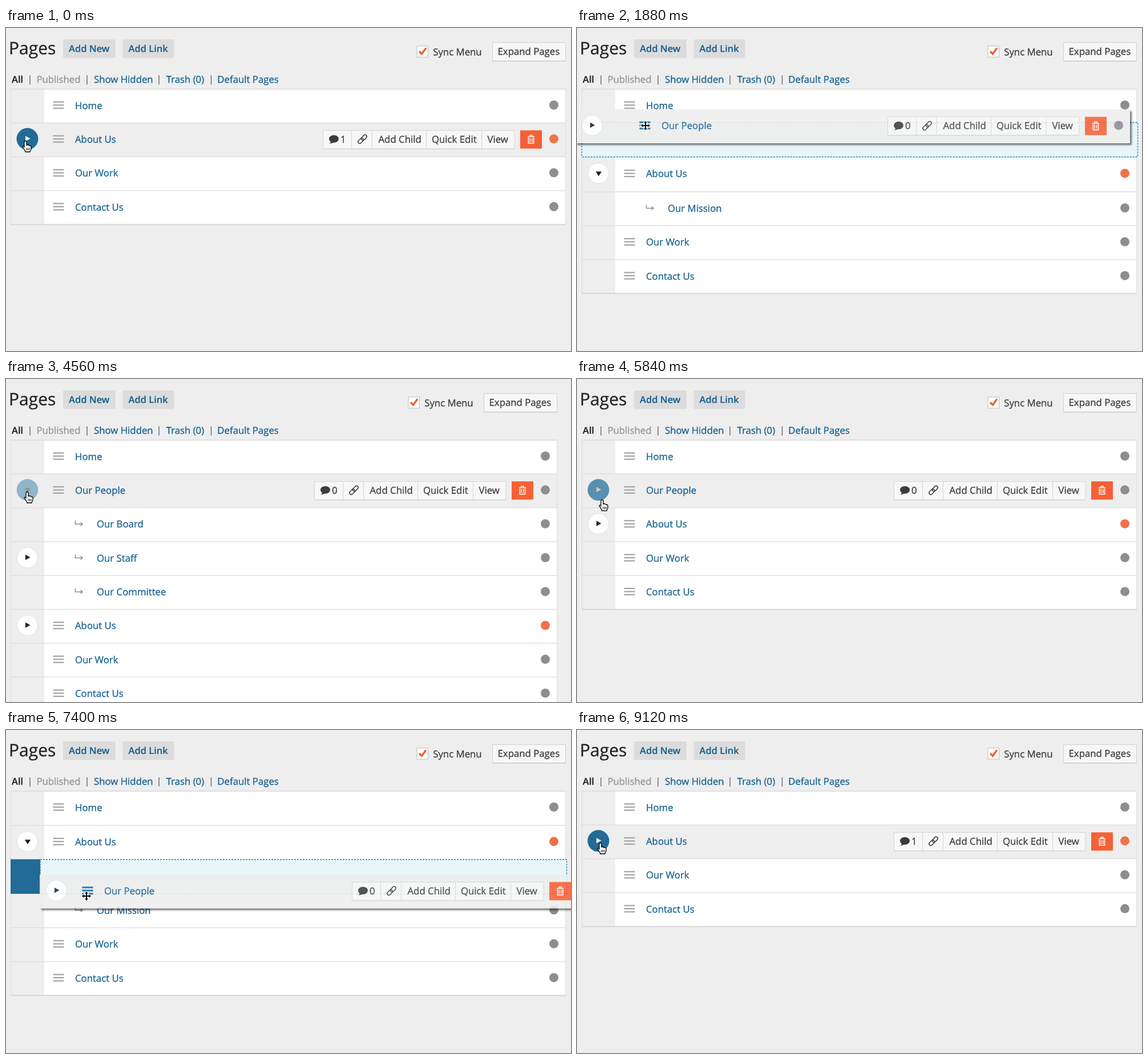
Animation of 990 by 566 pixels, one loop 9240 ms. Source, as an HTML page:

```html
<!DOCTYPE html>
<html lang="en">
<head>
<meta charset="utf-8">
<title>Page tree</title>
<style>
  html, body { margin: 0; width: 100%; height: 100%; overflow: hidden; background: #eee; }
  svg { display: block; width: 990px; height: 566px; font: 16.8px "Open Sans", sans-serif; }
  text { fill: currentColor; stroke: currentColor; stroke-width: .3px; text-rendering: geometricPrecision; }
  .semi { font-weight: 600; font-size: 16.5px; stroke-width: .2px; }
  .title { font-size: 30px; }
  .link { color: #16628f; }
  .lift { opacity: .87; filter: drop-shadow(3px 3px 1.5px #0009); }
</style>
</head>
<body>
<svg id="stage" viewBox="0 0 990 566"></svg>
<script>
const LOOP = 9240, STEP = 40, TOP = 107, PITCH = 59.35;
const BLUE = '#226b97', INK = '#3c3c3c', GRAY = '#8e8e92';
const stage = document.getElementById('stage');

const page = (label, more) => ({ label, ...more });
const HOME = page('Home'), ABOUT = page('About Us', { kids: true, hot: true, notes: 1 }),
  PEOPLE = page('Our People', { kids: true }), BOARD = page('Our Board', { child: true }),
  STAFF = page('Our Staff', { child: true, kids: true }), TEAM = page('Our Committee', { child: true }),
  MISSION = page('Our Mission', { child: true }), WORK = page('Our Work'), CONTACT = page('Contact Us');

// Each drag: start, end, grab point, is the lifted page a child
const DRAGS = [
  { from: 1000, to: 2120, grab: [131, 254], slot: 2, child: true, limit: 212 },
  { from: 6840, to: 7640, grab: [90, 204], slot: 1, child: false, limit: 240 }
];
// Pointer path: time, x, y
const PATH = [
  [0, 34, 199], [280, 36, 199], [840, 131, 254], [1040, 131, 254], [1880, 120, 171], [2040, 120, 171],
  [2120, 118, 173], [2280, 112, 178], [3000, 36, 199], [3880, 36, 199], [4160, 38, 436], [4280, 38, 436],
  [4560, 37, 199], [5080, 37, 199], [5720, 45, 201], [6120, 40, 256], [6200, 40, 256], [6600, 92, 204.5],
  [6840, 92, 204.5], [7160, 139, 288], [7400, 141, 291], [7640, 141, 283], [7760, 140, 278],
  [8320, 40, 199], [9080, 41, 199], [9240, 41, 199]
];

const wrap = t => (t + LOOP) % LOOP;
const within = (t, a, b) => t >= a && t < b;
const dragAt = t => DRAGS.find(d => within(t, d.from, d.to));

function pointer(t) {
  const i = PATH.findIndex(p => p[0] > t), a = PATH[i - 1], b = PATH[i];
  const u = (t - a[0]) / (b[0] - a[0]), s = u * u * (3 - 2 * u);
  return [a[1] + (b[1] - a[1]) * s, a[2] + (b[2] - a[2]) * s];
}

function isOpen(p, t) {
  if (p === ABOUT) return within(t, 200, 4240) || within(t, 6120, 8840);
  return p === PEOPLE && within(t, 3360, 4600);
}

function layout(t) {
  const drag = dragAt(t), aboutOpen = isOpen(ABOUT, t);
  const nested = t < 1000 || t >= 7640, list = [HOME];
  if (!nested && !drag) {
    list.push(PEOPLE);
    if (isOpen(PEOPLE, t)) list.push(BOARD, STAFF, TEAM);
  }
  list.push(ABOUT);
  if (aboutOpen) {
    if (nested) list.push(PEOPLE);
    list.push(MISSION);
  }
  list.push(WORK, CONTACT);
  let slot = 0;
  if (drag) {
    slot = pointer(t)[1] > drag.limit ? 2 : 1;
    list.splice(slot, 0, null);
  }
  const aboutAt = list.indexOf(ABOUT);
  const rows = list.map((p, i) => ({
    p, child: p && (p.child || (p === PEOPLE && nested)),
    y: TOP + PITCH * i + (drag && i >= aboutAt ? (i > aboutAt ? 2.2 : 1) : 0)
  }));
  const bottom = TOP + PITCH * list.length + (drag ? 2 : 0);
  return { rows, drag, slot, bottom, right: bottom > 566 ? 965 : 980 };
}

function hit(t) {
  const lay = layout(t), [x, y] = pointer(t);
  if (lay.drag) return { zone: 'handle' };
  const r = lay.rows.find(r => y >= r.y && y < r.y + PITCH);
  if (!r) return {};
  const cy = r.y + 28, hx = r.child ? 130 : 92;
  let zone = 'row';
  if (r.p.kids && Math.hypot(x - 37.5, y - cy) < 19.2) zone = 'toggle';
  else if (Math.abs(x - hx) < 12 && Math.abs(y - cy) < 12) zone = 'handle';
  return { p: r.p, zone };
}

// Button fade: share of the last few steps spent over it
function glow(p, t) {
  let n = 0;
  for (let k = 0; k < 4; k++) {
    const h = hit(wrap(t - k * STEP));
    if (h.p === p && h.zone === 'toggle') n++;
  }
  return n / 4;
}

const text = (x, y, s, color = INK, cls = '') => `<text x="${x}" y="${y}" color="${color}" class="${cls}">${s}</text>`;
const link = (x, y, s, cls = '') => text(x, y, s, INK, 'link ' + cls);
const rect = (x, y, w, h, fill, more = '') => `<rect x="${x}" y="${y}" width="${w}" height="${h}" fill="${fill}" ${more}/>`;
const path = (d, more) => `<path d="${d}" ${more}/>`;
const at = (x, y, s, more = '') => `<g transform="translate(${x} ${y})" ${more}>${s}</g>`;
const mix = (a, b, u) => `rgb(${a.map((v, i) => Math.round(v + (b[i] - v) * u))})`;

function toggle(open, g) {
  const tri = open ? 'M-4.7-3.2H5.7L.5 4.8Z' : 'M-3.5-5.2L5-.5L-3.5 4.2Z';
  return `<circle r="${18 + g}" fill="${mix([255, 255, 255], [34, 107, 151], g)}"
    stroke="${mix([224, 224, 224], [34, 107, 151], g)}" stroke-width="${1 - g}"/>` +
    path(tri, `fill="${mix([34, 34, 34], [255, 255, 255], g)}"`);
}

const handle = on => [-5.5, 0, 5.5].map(y =>
  rect(-9.5, y - (on ? 1.5 : 1), 19, on ? 3 : 2.2, on ? '#176ba3' : '#a3a3a3')).join('');
const elbow = path('M-6-5.5V.5H6M3-2.5L6.5.5L3 3.5', 'fill="none" stroke="#8d8d8d" stroke-width="1.5"');

const bubble = `<ellipse rx="8.5" ry="6.7" fill="${INK}"/>` + path('M-6 2C-5 6-6 7-8 8C-4 8.4-1 7 1 4Z', `fill="${INK}"`);
const chain = `<g transform="rotate(-45)" fill="none" stroke="${INK}" stroke-width="1.5">
  <rect x="-9.5" y="-3" width="11" height="6" rx="3"/><rect x="-1.5" y="-3" width="11" height="6" rx="3"/></g>`;
const bin = path('M-6-4.5H6M-2-4.5V-7H2V-4.5M-4.7-3V7H4.7V-3M-1.8-2V5M1.8-2V5', 'fill="none" stroke="#fff" stroke-width="1.5"');

// Tool strip, placed from the right edge of the list
function tools(p, right) {
  const s = rect(555.5, -14.8, 335.5, 31.8, '#f7f7f7', 'stroke="#d6d6d6"') +
    path('M605.5-15V17M641.5-15V17M736.5-15V17M833.5-15V17', 'stroke="#d6d6d6"') +
    path('M556 17.8H891', 'stroke="#d9d9d9"') +
    at(574.5, 0, bubble) + text(586, 6.7, p.notes || 0) + at(624.5, .5, chain) +
    text(652.5, 6.7, 'Add Child') + text(746, 6.7, 'Quick Edit') + text(843.5, 6.7, 'View') +
    rect(901, -15, 38, 32, '#f66036') + at(920, .7, bin);
  return at(right - 980, 0, s);
}

function row(r, right, o) {
  const { p, child } = r, inset = child ? 38 : 0;
  let s = rect(8, 0, right - 8, PITCH, '#eee');
  if (!o.hover) s += rect(67, 0, right - 67, PITCH, '#fff');
  if (!o.lifted) s += rect(8, -.7, right - 8, 1.2, '#dcdcdc');
  let parts = '';
  if (p.kids) parts += at(37.5, 0, toggle(o.open, o.glow));
  parts += child && !o.hover ? at(127.5, 0, elbow) : at(92 + inset, 0, handle(o.grip));
  parts += link(121 + inset, 6.7, p.label);
  if (o.hover) parts += tools(p, right);
  parts += `<circle cx="${right - 20}" r="8" fill="${p.hot ? '#f07249' : GRAY}"/>`;
  return s + at(0, 28, parts);
}

function gap(y, child) {
  const x = child ? 60 : 8.5;
  return (child ? rect(8, y - .5, 52, 60.5, BLUE) : '') +
    rect(x, y, 982.5 - x, 60.3, '#e8f6f9', 'stroke="#1b7fb8" stroke-width="1.3" stroke-dasharray="3 2"');
}

function header(right) {
  const bar = [42, 142, 268, 359.5].map(x => rect(x - .7, 83, 1.4, 16, '#666')).join('');
  const side = rect(720, 31.5, 19.5, 19.5, '#fff', 'stroke="#bdbdbd"') +
    path('M724 41L728.5 45.5L736 35', 'fill="none" stroke="#f15a2b" stroke-width="3.2"') +
    text(748.2, 48, 'Sync Menu') +
    rect(852.5, 25.5, 128, 32, '#f7f7f7', 'stroke="#d0d0d0"') + rect(852, 57.5, 129, 1.3, '#d3d3d3') +
    text(861.5, 47.3, 'Expand Pages');
  return text(5, 46, 'Pages', '#222', 'title') +
    rect(100, 20, 92, 32.5, '#dcdcdc', 'rx="1.5"') + link(110, 42, 'Add New', 'semi') +
    rect(204.5, 20, 90, 32.5, '#dcdcdc', 'rx="1.5"') + link(214.5, 42, 'Add Link', 'semi') +
    text(10, 96, 'All', '#222', 'semi') + text(53.4, 96, 'Published', '#959595') +
    link(154, 96, 'Show Hidden') + link(280.7, 96, 'Trash (0)') +
    link(370.3, 96, 'Default Pages') + bar + at(right - 980, 0, side);
}

const HAND = path('M-2 1C-2-2 2-2 2 1V7C2 5 5 5 5 7.2C5 6 7.5 6 7.5 8C8 7 10 7 10 9V13C10 15 8 16 8 18H0C0 16-2 14-4 11C-6 8-4 7-2 9.5Z',
  'fill="#fff" stroke="#000" stroke-width="1.3"') + path('M2 11V15M4.5 11V15M7 11V15', 'stroke="#000"');
const CROSS = path('M0-8L3-4.5H1V-1H4.5V-3L8 0L4.5 3V1H1V4.5H3L0 8L-3 4.5H-1V1H-4.5V3L-8 0L-4.5-3V-1H-1V-4.5H-3Z',
  'fill="#000" stroke="#fff" stroke-width="2" paint-order="stroke"');
const ARROW = path('M0 0V16L4 12.5L6.5 18L9 17L6.5 11.5H12Z', 'fill="#000" stroke="#fff" stroke-width="1.2"');

function draw(t) {
  const lay = layout(t), { drag, right, bottom } = lay, h = hit(t), [x, y] = pointer(t);
  let s = header(right);
  for (const r of lay.rows) {
    if (!r.p) continue;
    const hover = r.p === h.p;
    s += at(0, r.y, row(r, right, {
      hover, open: isOpen(r.p, t), grip: hover && h.zone === 'handle', glow: r.p.kids ? glow(r.p, t) : 0
    }));
  }
  s += path(`M8.5 ${bottom}V107.5H${right + .5}V${bottom}`, 'fill="none" stroke="#dedede"') +
    rect(8, bottom - 1, right - 7, 2, '#d8d8d8');
  if (drag) {
    s += gap(lay.slot === 1 ? 165.5 : 227, lay.slot === 2);
    const lifted = row({ p: PEOPLE, child: drag.child }, right, { hover: true, grip: true, lifted: true, glow: 0 });
    s += at(x - drag.grab[0], TOP + PITCH * drag.slot + y - drag.grab[1], lifted, 'class="lift"');
  }
  const shape = h.zone === 'toggle' || (h.p && h.p.kids && x < 60) ? HAND : h.zone === 'handle' ? CROSS : ARROW;
  return s + at(x, y, shape);
}

let last = -1;
function tick(now) {
  const t = Math.floor(now % LOOP / STEP) * STEP;
  if (t !== last) stage.innerHTML = draw(last = t);
  requestAnimationFrame(tick);
}
tick(performance.now());
</script>
</body>
</html>
```
